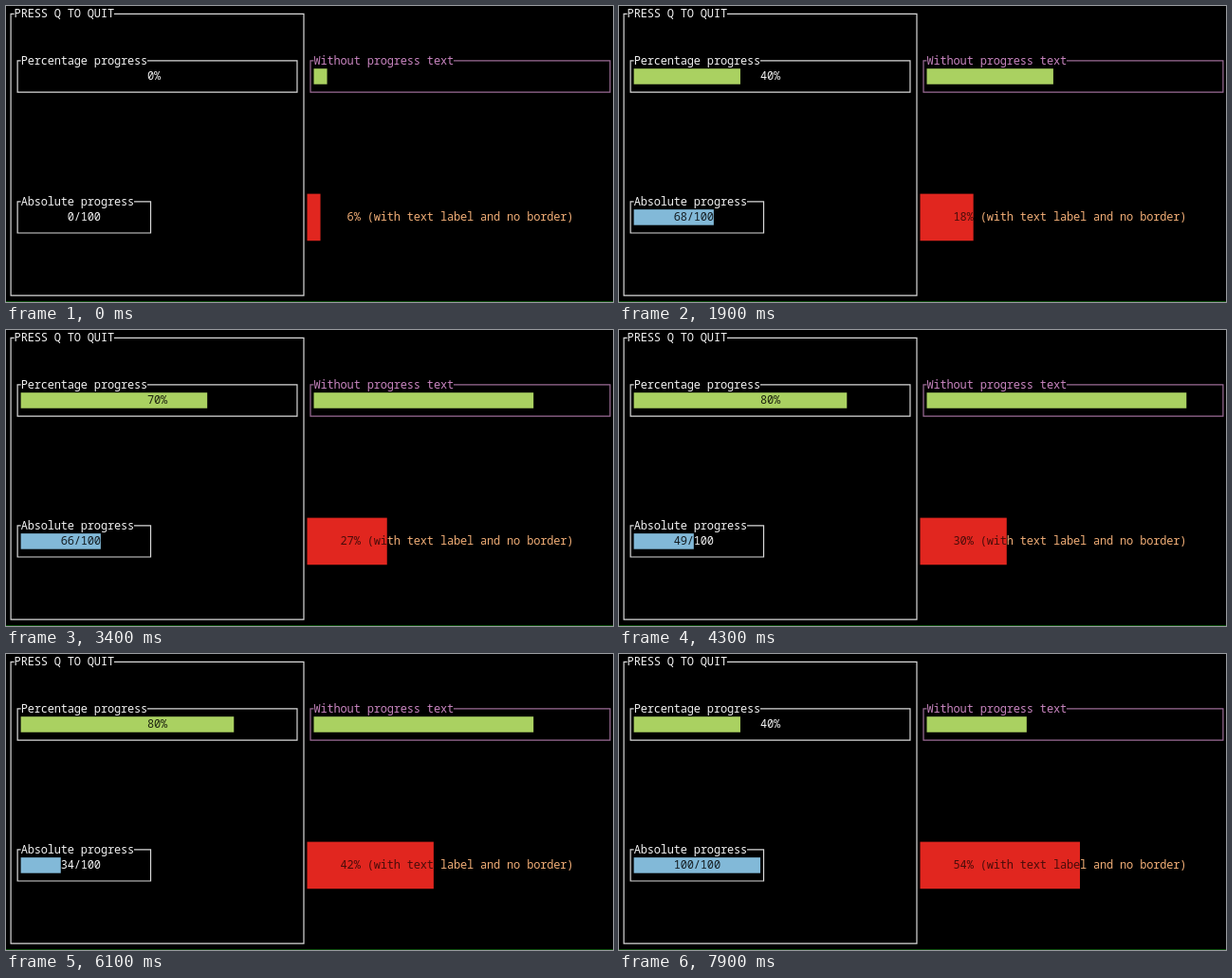
These frames come from a looping animation (640 px wide and 313 px high, 8 s). An HTML page with a canvas:

```html
<!DOCTYPE html>
<html lang="en">
<head>
<meta charset="utf-8">
<title>Gauges</title>
<style>
html, body { margin: 0; width: 100%; height: 100%; overflow: hidden; background: #000; }
canvas { display: block; }
</style>
</head>
<body>
<canvas id="stage" width="640" height="313"></canvas>
<script>
const ctx = document.getElementById('stage').getContext('2d');
const LOOP = 8000, FRAME = 100, TICK = 251;
const CW = 7.02, CH = 16.55;          // terminal cell size
const colX = c => 1.6 + c * CW;
const rowY = r => r * CH;
const WHITE = '#f2f2f2', LINE = '#dadada';
const GREEN = '#aad161', BLUE = '#82b9d8', RED = '#e1261f';

function write(text, col, row, colorAt) {
  [...text].forEach((ch, i) => {
    ctx.fillStyle = colorAt(col + i);
    ctx.fillText(ch, colX(col + i), rowY(row) + 12);
  });
}

// Box drawn through cell centres, with a gap in the top line for the title.
function box(c0, r0, c1, r1, title, line, color) {
  const x0 = colX(c0 + 0.5), x1 = colX(c1 + 0.5);
  const y0 = rowY(r0 + 0.5), y1 = rowY(r1 + 0.5);
  ctx.strokeStyle = line;
  ctx.beginPath();
  ctx.moveTo(colX(c0 + 1), y0);
  ctx.lineTo(x0, y0);
  ctx.lineTo(x0, y1);
  ctx.lineTo(x1, y1);
  ctx.lineTo(x1, y0);
  ctx.lineTo(colX(c0 + 1 + title.length), y0);
  ctx.stroke();
  write(title, c0 + 1, r0, () => color);
}

// Filled cells plus a centred label that turns dark over the fill.
function gauge(col, cols, row, rows, percent, fill, label, color, dark) {
  const filled = Math.floor(cols * percent / 100);
  ctx.fillStyle = fill;
  ctx.fillRect(colX(col), rowY(row), filled * CW, rows * CH);
  const start = col + Math.floor((cols - label.length) / 2);
  write(label, start, row + (rows - 1) / 2, c => c < col + filled ? dark : color);
}

// Bounces between 0 and 100, snapping to the ends when less than a step away.
function progress(step, ticks) {
  let value = 0, dir = 1;
  while (ticks-- > 0) {
    value += step * dir;
    if (100 - value < step) value = 100;
    else if (value < step) value = 0;
    if (value === 100) dir = -1;
    if (value === 0) dir = 1;
  }
  return value;
}

function draw(t) {
  const fast = Math.floor((t + 140) / TICK);
  const slow = Math.floor(fast / 2);
  const late = Math.floor((t + 125) / (2 * TICK));
  const percent = progress(10, slow);
  const count = progress(17, late);
  const plain = progress(5, fast + 1);
  const labelled = progress(3, slow + 2);

  ctx.fillStyle = '#000';
  ctx.fillRect(0, 0, 640, 313);
  ctx.fillStyle = '#0b4a0b';
  ctx.fillRect(0, 312, 640, 1);
  ctx.font = '12px "Noto Sans Mono", "DejaVu Sans Mono", monospace';
  ctx.lineWidth = 1.2;

  box(0, 0, 44, 18, 'PRESS Q TO QUIT', LINE, WHITE);
  box(1, 3, 43, 5, 'Percentage progress', LINE, WHITE);
  box(1, 12, 21, 14, 'Absolute progress', LINE, WHITE);
  box(45, 3, 90, 5, 'Without progress text', '#9c6c97', '#c985c0');

  gauge(2, 41, 4, 1, percent, GREEN, percent + '%', WHITE, '#1c210f');
  gauge(2, 19, 13, 1, count, BLUE, count + '/100', WHITE, '#141d22');
  gauge(46, 44, 4, 1, plain, GREEN, '', WHITE, '#000');
  gauge(45, 46, 12, 3, labelled, RED,
    labelled + '% (with text label and no border)', '#f0ad76', '#4a0d0a');
}

function play() {
  draw(Math.floor(performance.now() % LOOP / FRAME) * FRAME);
  requestAnimationFrame(play);
}
play();
</script>
</body>
</html>
```
